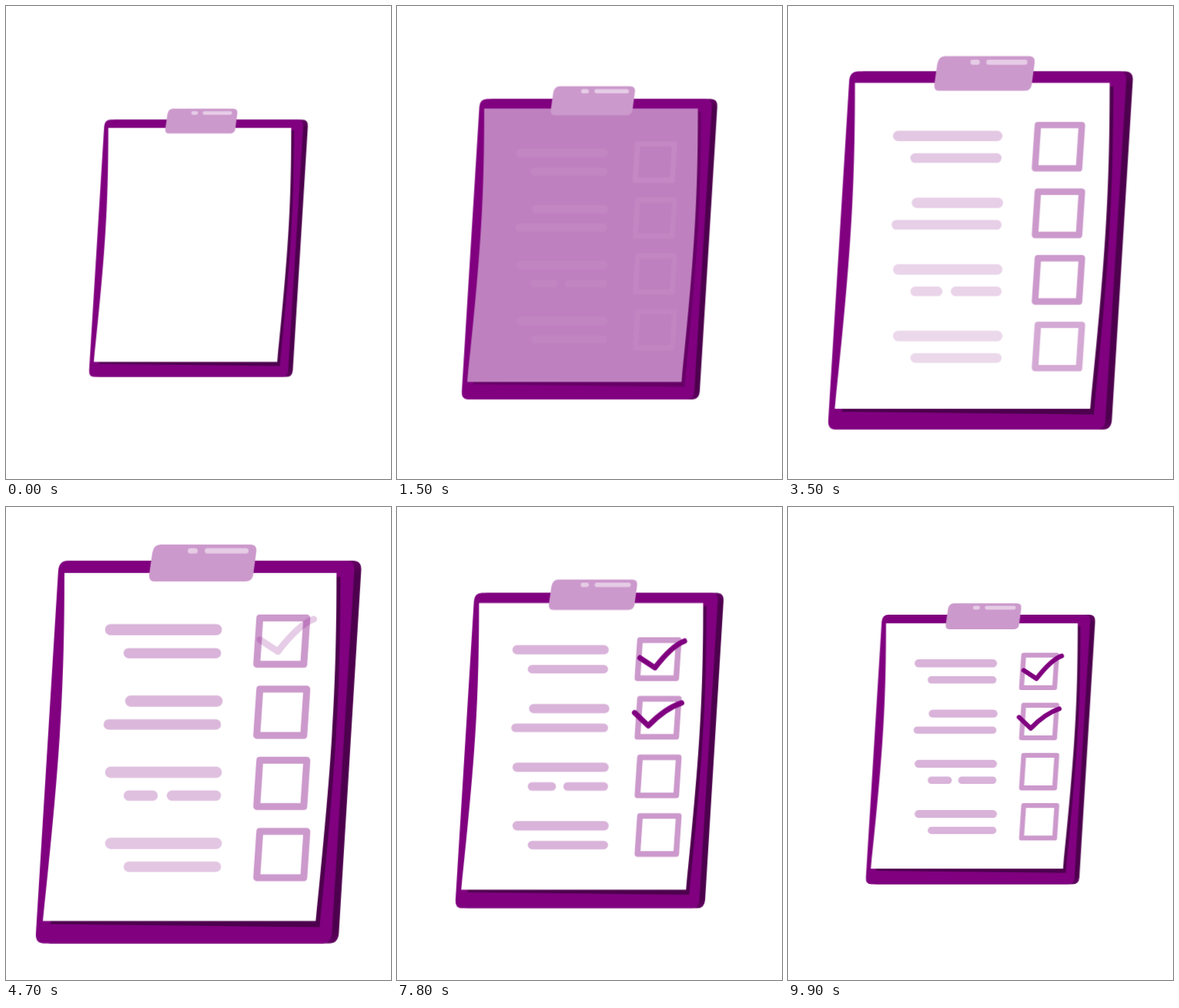
These frames come from a looping animation (500 by 615 pixels, 10 s). An HTML page:

```html
<!DOCTYPE html>
<html lang="en">
<head>
<meta charset="utf-8">
<title>Checklist</title>
<style>
  @property --t { syntax: '<number>'; inherits: true; initial-value: 0; }

  html, body { margin: 0; width: 100%; height: 100%; overflow: hidden; background: #fff; }
  svg { display: block; width: 500px; height: 615px; animation: clock 10s linear infinite; }

  /* --t is the loop time in seconds */
  @keyframes clock { from { --t: 0; } to { --t: 10; } }

  .clipboard { transform-origin: 250px 307.5px; animation: zoom 10s linear infinite; }
  @keyframes zoom {
    0% { transform: scale(.673); }
    45% { transform: scale(1.0125); }
    100% { transform: scale(.6997); }
  }

  .sheet { opacity: max(1 - var(--t), var(--t) - 1); }
  /* fades in from second --a to second --b */
  .fade { --a: 1; opacity: calc((var(--t) - var(--a)) / (var(--b) - var(--a))); }

  .lines, .box, .check { fill: none; stroke-linecap: round; stroke-linejoin: round; }
  .lines { stroke: #d9b3d9; }
  .long { stroke-width: 14.6; }
  .short { stroke-width: 13.4; }
  .box { stroke: #c9c; stroke-width: 9; }
  .check { stroke: #800080; stroke-width: 8.5; }
</style>
</head>
<body>
<svg viewBox="0 0 500 615">
  <defs>
    <linearGradient id="edge" x2="0" y2="1">
      <stop offset="0" stop-color="#640064"/>
      <stop offset=".035" stop-color="#4d004d"/>
      <stop offset=".965" stop-color="#4d004d"/>
      <stop offset="1" stop-color="#640064"/>
    </linearGradient>
    <path id="board" d="M81 70H441Q453 70 452 83L423 554Q422 567 411 567H49Q38 567 39 554L68 83Q69 70 81 70Z"/>
    <path id="square" d="M329.5 144.5H390.5L386.5 204.5H325.5Z"/>
  </defs>

  <g class="clipboard">
    <use href="#board" x="9" fill="url(#edge)"/>
    <use href="#board" fill="#800080"/>

    <g class="sheet">
      <path fill="#4d004d" d="M429 91H434C434 245 428 335 407 546L58 542V530H402Z"/>
      <path fill="#fff" d="M76 86H429C429 240 423 330 402 538H48C70 330 76 240 76 86Z"/>
    </g>

    <path fill="#c9c" d="M201 49H317Q326 49 325 58L321 88Q320 97 310 97H193Q185 97 186 88L190 60Q192 49 201 49Z"/>
    <path fill="none" stroke="#e6cce6" stroke-width="7" stroke-linecap="round" d="M239.5 57.3H245.5M261.5 57.3H311.5"/>

    <g class="lines fade" style="--b:4.5">
      <path class="long" d="M136 159.6H273"/>
      <path class="short" d="M159.5 190.2H272.5"/>
    </g>
    <g class="lines fade" style="--b:5">
      <path class="long" d="M162 252.4H274"/>
      <path class="short" d="M133.5 282.8H272.5"/>
    </g>
    <g class="lines fade" style="--b:5.5">
      <path class="long" d="M136 344.8H273"/>
      <path class="short" d="M159.5 375.2H190.5M215.5 375.2H272.5"/>
    </g>
    <g class="lines fade" style="--b:6">
      <path class="long" d="M136 437.2H273"/>
      <path class="short" d="M159.5 467.6H272.5"/>
    </g>

    <use href="#square" class="box fade" style="--b:2.5"/>
    <use href="#square" class="box fade" y="92.4" style="--b:3"/>
    <use href="#square" class="box fade" y="184.8" style="--b:3.5"/>
    <use href="#square" class="box fade" y="277.2" style="--b:4"/>

    <path class="check fade" style="--a:4.5;--b:5.5" d="M329.5 172.5L353 188Q380 153 399.5 146"/>
    <path class="check fade" style="--a:5.5;--b:6.5" d="M321 259L342.5 279.5Q369 252 395 243.5"/>
  </g>
</svg>
</body>
</html>
```
